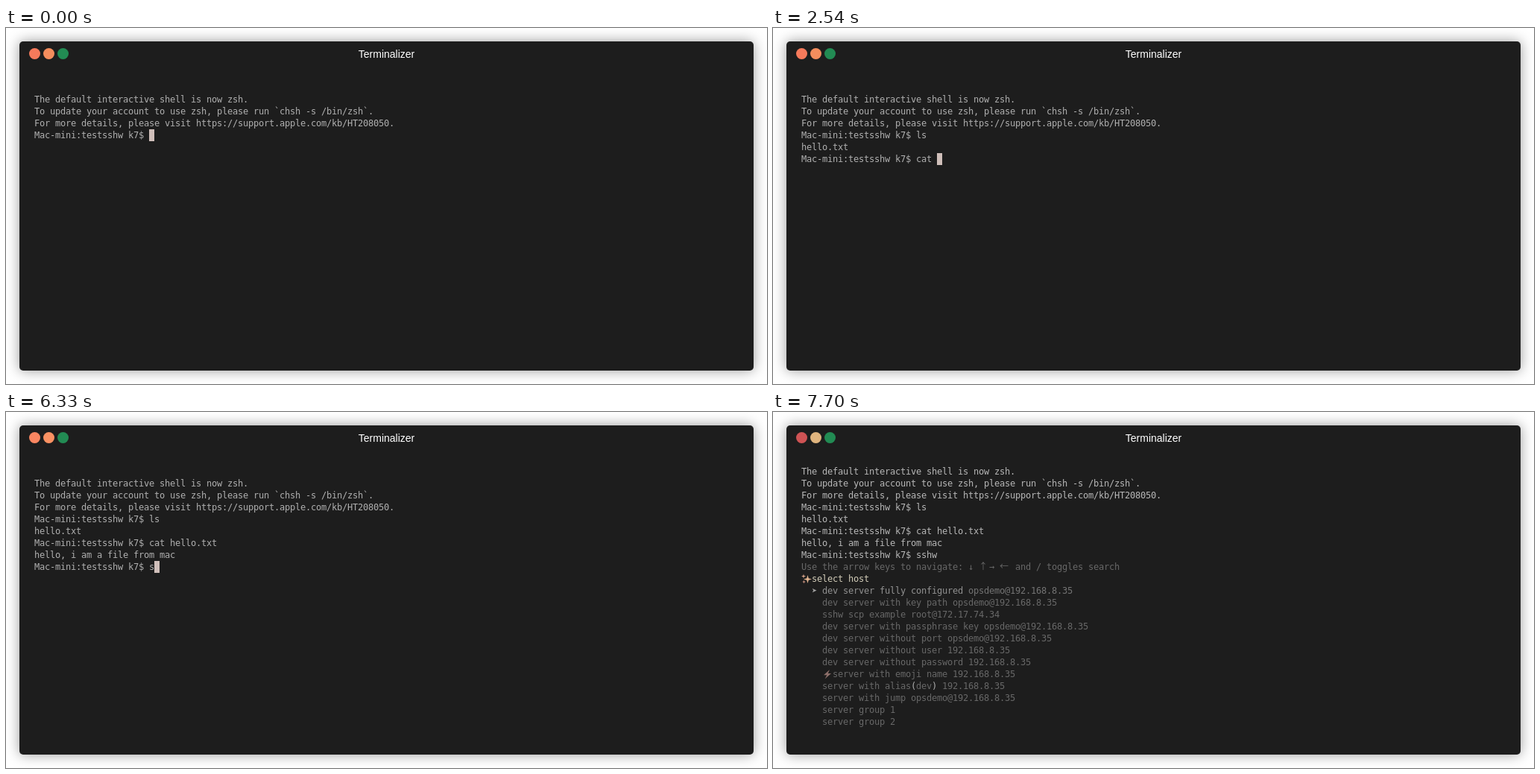
Animation, 1021 px wide and 478 px high, one loop 8 s. Source, as an HTML page:

```html
<!DOCTYPE html>
<html lang="en">
<head>
<meta charset="utf-8">
<title>Terminal session</title>
<style>
  html, body { margin: 0; width: 100%; height: 100%; overflow: hidden; background: #fff; }
  #window {
    position: absolute; left: 18px; top: 18px; width: 985px; height: 442px;
    border-radius: 5px; background: #1d1d1d; box-shadow: 0 0 18px rgba(0, 0, 0, .4);
  }
  svg { position: absolute; left: 0; top: 0; display: block; }
  text { white-space: pre; }
  .title { font: 14px "Liberation Sans", Arial, sans-serif; fill: #fff; text-anchor: middle; }
  .term { font: 12px "DejaVu Sans Mono", monospace; letter-spacing: -.2246px; font-variant-ligatures: none; }
  .wide { font: 12px "Noto Sans CJK SC", "Noto Sans CJK JP", sans-serif; letter-spacing: 0; }
</style>
</head>
<body>
<div id="window"></div>
<svg width="1021" height="478" viewBox="0 0 1021 478">
  <g id="buttons">
    <circle cx="38.5" cy="34.5" r="7.5"/>
    <circle cx="57.5" cy="34.5" r="7.5"/>
    <circle cx="76.5" cy="34.5" r="7.5" fill="#228b53"/>
  </g>
  <text class="title" x="510.5" y="40">Terminalizer</text>
  <g id="screen" class="term"></g>
  <rect id="cursor" width="7" height="16"/>
</svg>
<script>
const LOOP = 8000, LEFT = 38, TOP = 72, CELL = 7, ROW = 16;
const FG = '#b0b0b0', DIM = '#686868';
const MENU_AT = 7700;
const PROMPT = 'Mac-mini:testsshw k7$ ';
const INTRO = '\nThe default interactive shell is now zsh.\n' +
  'To update your account to use zsh, please run `chsh -s /bin/zsh`.\n' +
  'For more details, please visit https://support.apple.com/kb/HT208050.\n' + PROMPT;

// [time, text appended to the screen]
const OUTPUT = [
  [0, INTRO],
  [500, 'l'], [700, 's'], [1150, '\nhello.txt\n' + PROMPT],
  [1790, 'c'], [1890, 'a'], [2250, 't'], [2540, ' '],
  [3390, 'h'], [3490, 'e'], [3720, 'llo.txt '],
  [4330, '\nhello, i am a file from mac\n' + PROMPT],
  [6330, 's'], [6510, 's'], [6670, 'h'], [6870, 'w'], [7230, '\n']
];

// [time, left button, middle button, cursor]
const TINTS = [
  [0, '#f67a5b', '#f48d5d', '#d0bfba'],
  [6330, '#fa8661', '#fa9162', '#d0bfba'],
  [7230, '#ee6a5b', '#f5a164', '#dcbbac'],
  [MENU_AT, '#cf5354', '#dfb47e', '#d0bfba']
];

const HOSTS = [
  'dev server with key path opsdemo@192.168.8.35',
  'sshw scp example root@172.17.74.34',
  'dev server with passphrase key opsdemo@192.168.8.35',
  'dev server without port opsdemo@192.168.8.35',
  'dev server without user 192.168.8.35',
  'dev server without password 192.168.8.35',
  '  server with emoji name 192.168.8.35',
  'server with alias(dev) 192.168.8.35',
  'server with jump opsdemo@192.168.8.35',
  'server group 1',
  'server group 2'
];

const screen = document.getElementById('screen');
const cursor = document.getElementById('cursor');
const buttons = document.getElementById('buttons').children;

const colX = col => LEFT + col * CELL;
const rowY = row => TOP + row * ROW;

function put(row, col, str, fill = FG, cls = '') {
  return `<text x="${colX(col)}" y="${rowY(row) + 12}" fill="${fill}" class="${cls}">${str}</text>`;
}

function star(x, y, r, fill) {
  const k = r * .22;
  return `<path fill="${fill}" d="M${x} ${y - r}L${x + k} ${y - k}L${x + r} ${y}L${x + k} ${y + k}` +
    `L${x} ${y + r}L${x - k} ${y + k}L${x - r} ${y}L${x - k} ${y - k}Z"/>`;
}

function menu() {
  const arrows = put(8, 32, '↓', DIM) + put(8, 34, '↑', DIM, 'wide') +
    put(8, 36, '→', DIM) + put(8, 38, '←', DIM, 'wide');
  const sparkles = star(46.5, 224.5, 5.5, '#e3b590') + star(41, 220.5, 3, '#dfa98e') + star(41.5, 228, 2.6, '#d79b86');
  const bolt = '<path fill="#8d6f6a" d="M76 346L68 353.2H72.3L69.6 358.5L78 351H73.8Z"/>';
  return put(8, 0, 'Use the arrow keys to navigate:', DIM) + arrows +
    put(8, 41, 'and / toggles search', DIM) +
    sparkles + put(9, 2, 'select host', '#d3cdb9') +
    put(10, 2, '➤', '#a0a0a0') + put(10, 4, 'dev server fully configured', '#929292') +
    put(10, 32, 'opsdemo@192.168.8.35', '#747474') +
    HOSTS.map((host, i) => put(11 + i, 4, host.replace(/[()]/g, ' '), DIM)).join('') +
    put(18, 21, '(') + put(18, 25, ')') + bolt;
}

let shown = null;

function render(t) {
  const tint = TINTS.findLast(([at]) => at <= t);
  const showMenu = t >= MENU_AT;
  const output = OUTPUT.filter(([at]) => at <= t).map(([, str]) => str).join('');
  const key = output + showMenu;
  if (key === shown) return;
  shown = key;

  const lines = output.split('\n');
  const last = lines.length - 1;
  const scroll = showMenu ? 1 : 0;
  screen.innerHTML = lines.map((line, i) => line && put(i - scroll, 0, line, showMenu ? '#b8b8b8' : FG)).join('') +
    (showMenu ? menu() : '');

  cursor.setAttribute('x', colX(lines[last].length));
  cursor.setAttribute('y', rowY(last));
  cursor.setAttribute('fill', tint[3]);
  cursor.setAttribute('visibility', showMenu ? 'hidden' : 'visible');
  buttons[0].setAttribute('fill', tint[1]);
  buttons[1].setAttribute('fill', tint[2]);
}

const start = performance.now();
function tick() {
  render((performance.now() - start) % LOOP);
  requestAnimationFrame(tick);
}
tick();
</script>
</body>
</html>
```
